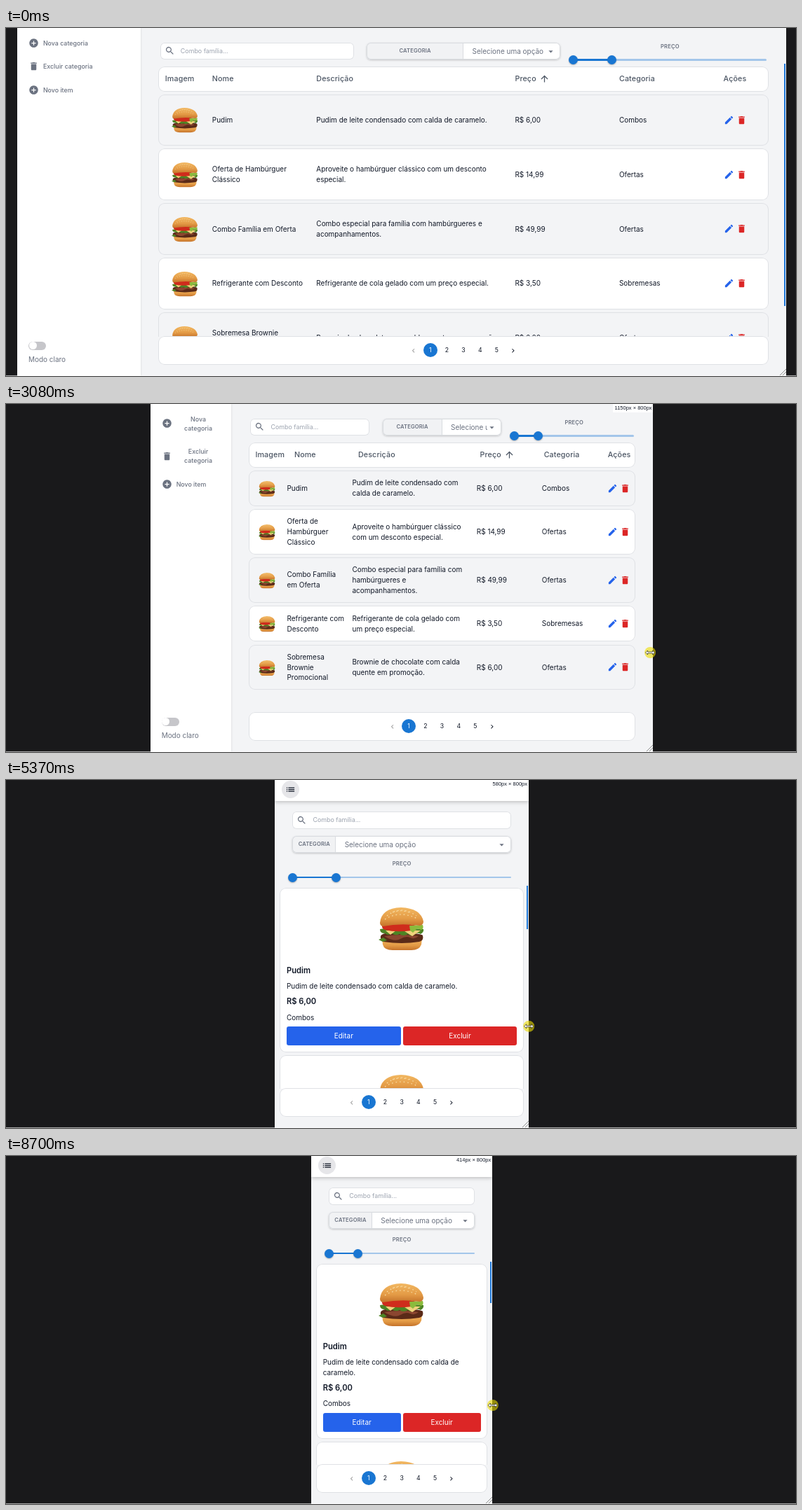
Write an HTML page that moves like this. It is 1126 px wide and 497 px high and loops after 8.96 s.

```html
<!DOCTYPE html>
<html lang="pt-BR">
<head>
<meta charset="utf-8">
<style>
  html, body { margin: 0; width: 100%; height: 100%; overflow: hidden; background: #19191b; }
  body { position: relative; font: 9.97px/1.5 Inter, sans-serif; color: #111827; }
  body::after { content: ""; position: absolute; left: 0; right: 0; top: 496px; height: 1px; background: #fff9; }
  svg { display: block; flex: none; }
  .icon { width: 15px; height: 15px; fill: currentColor; }
  #page { position: absolute; top: 0; height: 497px; overflow: hidden; background: #f3f4f6; }
  .box { background: #fff; border-radius: 9px; box-shadow: inset 0 0 0 1px #dfe1e5; }

  aside { position: absolute; left: 0; top: 0; bottom: 0; width: var(--side); background: #fff;
    box-shadow: 0 0 3px #0002; color: #6b7280; }
  .menu { position: absolute; left: 16px; right: 15.5px; top: 14.5px; font: 500 8.85px/13px Inter, sans-serif; }
  .menu div { display: flex; align-items: center; gap: 6px; margin-bottom: 20.6px; text-align: center; }
  .menu .icon { margin: -1px 0; }
  .toggle { position: absolute; left: 16px; top: 447.5px; width: 25px; height: 12.5px; border-radius: 7px; background: #c6c6ca; }
  .toggle::after { content: ""; position: absolute; left: .7px; top: .7px; width: 11px; height: 11px; border-radius: 50%; background: #fff; }
  .mode { position: absolute; left: 16px; top: 466px; }

  nav { display: none; position: absolute; left: 0; right: 0; top: 0; height: 29.5px; background: #fff; box-shadow: 0 1px 6px #0004; }
  nav span { position: absolute; left: 9.7px; top: 1.3px; width: 25px; height: 25px; border-radius: 50%; background: #e6e6e9;
    display: grid; place-items: center; }

  main { position: absolute; left: var(--left); right: var(--right); top: 0; bottom: 0; }
  .filters { position: absolute; left: var(--inset); right: var(--inset); top: 20.5px; display: grid;
    grid-template-columns: repeat(3, minmax(0, 1fr)); gap: 10px 18.6px; }
  .filters > * { height: 24.5px; position: relative; }
  .filters .box { border-radius: 6px; }
  .search { font-size: 8.9px; line-height: 24.5px; color: #9ca3af; padding-left: 29px; box-sizing: border-box; }
  .search .icon { position: absolute; left: 6px; top: 4.5px; color: #6b7280; }
  .category { display: flex; color: #6b7280; line-height: 24.5px; }
  .filters .category { box-shadow: inset 0 0 0 1px #d9dce0, 0 1px 3px #0003; }
  .caps { font-size: 7.6px; font-weight: 600; letter-spacing: .15px; text-align: center; }
  .category .caps { width: 50%; box-sizing: border-box; background: #f1f2f4; border-radius: 6px 0 0 6px;
    box-shadow: inset 0 0 0 1px #d9dce0; }
  .select { flex: 1; min-width: 0; position: relative; padding-left: 12.5px; padding-right: 20px; }
  .select span { display: block; overflow: hidden; white-space: nowrap; }
  .select .icon { position: absolute; right: 6px; top: 5px; }
  .price-filter .caps { line-height: 11px; color: #6b7280; }
  .rail, .rail i { position: absolute; left: 0; height: 2.4px; border-radius: 2px; }
  .rail { top: 23.8px; width: 100%; background: #a3c6ea; }
  .rail i { width: 20%; background: #1976d2; }
  .rail b { position: absolute; top: -5.3px; width: 13px; height: 13px; margin-left: -6.5px; border-radius: 50%;
    background: #1976d2; box-shadow: 0 1px 2px #0004; }

  .row, .head { display: grid; align-items: center;
    grid-template-columns: var(--first) minmax(0, 18.73fr) minmax(0, 35.7fr) minmax(0, 18.73fr) minmax(0, 18.73fr) minmax(0, 8.1fr); }
  .head { --first: var(--head-first); position: absolute; left: 0; right: 0; top: 55px; height: 35.5px; color: #4b5563;
    font-size: 10.7px; font-weight: 500; letter-spacing: .12px; white-space: nowrap; }
  .head > :first-child { padding-left: 9.5px; }
  .head span { display: flex; align-items: center; gap: 4.5px; }
  .list { position: absolute; left: 0; right: 0; top: 94.5px; height: 346.5px; overflow: hidden;
    display: flex; flex-direction: column; gap: 4.4px; }
  .row { flex: none; min-height: calc(var(--first) - 3px); padding: 9.75px 0; box-sizing: border-box; }
  .row:nth-child(odd) { background: #f3f4f6; }
  .row p { margin: 0; padding-right: 10px; }
  .burger { width: calc(var(--table) * .0438); margin-left: calc(6px + var(--table) * .0144); position: relative; top: 1px; }
  .actions { display: flex; gap: 3px; }
  .actions span { color: #2563eb; }
  .actions span + span { color: #dc2626; }
  .actions em { display: none; font-style: normal; }

  .pager { position: absolute; left: 0; right: 0; top: 440.3px; height: 40.3px; display: flex; justify-content: center;
    align-items: center; gap: 3.7px; font-size: 8.7px; }
  .pager span { width: 20px; height: 20px; border-radius: 50%; display: grid; place-items: center; }
  .pager .on { background: #1976d2; color: #fff; }
  .pager .icon { width: 11.5px; height: 11.5px; }
  #bar { position: absolute; right: .6px; width: 2.4px; background: #1f78d8; }
  #size { position: absolute; right: 0; top: 0; height: 12px; padding: 0 1.5px 0 3px; background: #fff;
    font: 7.5px/12px "Liberation Sans", Arial, sans-serif; white-space: nowrap; }
  .grip { position: absolute; right: 0; bottom: 1px; width: 9px; height: 9px; stroke: #777; stroke-width: .8; }
  #cursor { position: absolute; left: -9px; top: -9px; width: 18px; height: 18px; }

  .mobile nav { display: block; }
  .mobile aside, .mobile .head { display: none; }
  .mobile .filters { top: 45px; grid-template-columns: minmax(0, 1fr); }
  .mobile .list { top: 154.3px; height: 286.7px; }
  .mobile .row { display: block; padding: 9.5px; background: #fff; }
  .mobile .row p { margin-bottom: 6.4px; padding: 0; }
  .mobile .burger { width: 66px; margin: 18px auto 20px; top: 0; }
  .mobile .row .name, .mobile .row .price { font-size: 11.2px; font-weight: 600; }
  .mobile .row .category-name { margin-bottom: 5.3px; }
  .mobile .actions svg { display: none; }
  .mobile .actions em { display: block; }
  .mobile .actions span { flex: 1; line-height: 27.4px; border-radius: 3px; text-align: center; color: #fff; background: #2563eb; }
  .mobile .actions span + span { background: #dc2626; }
  .small .category .caps { width: 61.7px; }
</style>
</head>
<body>
<svg width="0" height="0" style="position:absolute">
  <defs>
    <linearGradient id="bun" x2="0" y2="1"><stop stop-color="#f2b862"/><stop offset=".6" stop-color="#e39a45"/><stop offset="1" stop-color="#c4722a"/></linearGradient>
    <symbol id="burger" viewBox="0 0 66 62">
      <path fill="url(#bun)" d="M5 45q28 6 57-1l-1 9q-3 8-14 8H20Q8 61 6 53z"/>
      <path fill="#5a2a18" d="M3 41q2-6 30-5t30 4q2 7-5 9-25 4-51 0-5-3-4-8z"/>
      <path fill="#8b4630" d="M8 41q24-4 49 0-6 5-12 2t-14 2-23-4z"/>
      <path fill="#4d8424" d="M2 31q20-4 62 0 1 4-4 7-5-3-10 1-4 3-8-1-7 4-12 0-6 3-11-1-5 4-10 0-7 0-7-6zM0 46l7-3 5 4-6 2z"/>
      <path fill="#efd27c" d="M34 32l26 1-12 8zM10 33l15 0-8 6z"/>
      <path fill="#cf2c1c" d="M5 25q28-5 49 1-1 6-7 7-22 3-38-1-5-2-4-7z"/>
      <path fill="#8bbb3c" d="M44 26l19-1q2 5-2 7l-6-2-6 6-4-3z"/>
      <path fill="url(#bun)" d="M2 22Q4 1 32 0q28 1 32 20 0 5-5 6-27-4-53 1-4-1-4-5z"/>
      <path fill="none" stroke="#f8dda5" stroke-width="1.2" stroke-dasharray="1.6 4" d="M12 12Q32-4 54 12M9 17q22-14 48 0M20 7q12-5 26 1"/>
    </symbol>
  </defs>
</svg>
<div id="page">
  <aside><div class="menu"></div><div class="toggle"></div><div class="mode">Modo claro</div></aside>
  <nav><span></span></nav>
  <main>
    <div class="filters">
      <div class="box search">Combo família...</div>
      <div class="box category"><div class="caps">CATEGORIA</div><div class="select"><span>Selecione uma opção</span></div></div>
      <div class="price-filter"><div class="caps">PREÇO</div><div class="rail"><i></i><b style="left:0"></b><b style="left:20%"></b></div></div>
    </div>
    <div class="head box"></div>
    <div class="list"></div>
    <div class="pager box"></div>
  </main>
  <div id="bar"></div>
  <div id="size"></div>
  <svg class="grip" viewBox="0 0 9 9"><path d="M0 9L9 0M4 9L9 4"/></svg>
</div>
<svg id="cursor" viewBox="-9 -9 18 18">
  <circle id="halo" r="8" fill="#ecdc00" fill-opacity=".6"/>
  <path d="M-6.5 0l3-3v2h7v-2l3 3-3 3v-2h-7v2z" fill="#fff" stroke="#222" stroke-width=".7"/>
</svg>
<script>
const paths = {
  add: 'M12 2a10 10 0 1 0 .01 0zM17 13h-4v4h-2v-4H7v-2h4V7h2v4h4z',
  trash: 'M6 19c0 1.1.9 2 2 2h8c1.1 0 2-.9 2-2V7H6zM19 4h-3.5l-1-1h-5l-1 1H5v2h14z',
  pencil: 'M3 17.25V21h3.75L17.81 9.94l-3.75-3.75zM20.71 7.04q.7-.7 0-1.41l-2.34-2.34q-.7-.7-1.41 0l-1.83 1.83 3.75 3.75z',
  search: 'M15.5 14h-.8l-.3-.3a6.5 6.5 0 1 0-.7.7l.3.3v.8l5 5 1.5-1.5zM9.5 14a4.5 4.5 0 1 1 .01 0z',
  up: 'M4 12l1.4 1.4L11 7.8V20h2V7.8l5.6 5.6L20 12l-8-8z',
  list: 'M3 7h2v2H3zM3 11h2v2H3zM3 15h2v2H3zM7 7h14v2H7zM7 11h14v2H7zM7 15h14v2H7z',
  drop: 'M7 10l5 5 5-5z',
  prev: 'M15.4 7.4L14 6l-6 6 6 6 1.4-1.4-4.6-4.6z',
  next: 'M10 6L8.6 7.4l4.6 4.6-4.6 4.6L10 18l6-6z'
};
const $ = selector => document.querySelector(selector);
const icon = name => `<svg class="icon" viewBox="0 0 24 24"><path fill-rule="evenodd" d="${paths[name]}"/></svg>`;

const products = [
  ['Pudim', 'Pudim de leite condensado com calda de caramelo.', '6,00', 'Combos'],
  ['Oferta de Hambúrguer Clássico', 'Aproveite o hambúrguer clássico com um desconto especial.', '14,99', 'Ofertas'],
  ['Combo Família em Oferta', 'Combo especial para família com hambúrgueres e acompanhamentos.', '49,99', 'Ofertas'],
  ['Refrigerante com Desconto', 'Refrigerante de cola gelado com um preço especial.', '3,50', 'Sobremesas'],
  ['Sobremesa Brownie Promocional', 'Brownie de chocolate com calda quente em promoção.', '6,00', 'Ofertas']
];
$('.menu').innerHTML = [['add', 'Nova categoria'], ['trash', 'Excluir categoria'], ['add', 'Novo item']]
  .map(([name, text]) => `<div>${icon(name)}<span>${text}</span></div>`).join('');
$('nav span').innerHTML = icon('list');
$('.search').insertAdjacentHTML('beforeend', icon('search'));
$('.select').insertAdjacentHTML('beforeend', icon('drop'));
$('.head').innerHTML = ['Imagem', 'Nome', 'Descrição', 'Preço' + icon('up'), 'Categoria', 'Ações']
  .map(text => `<span>${text}</span>`).join('');
$('.list').innerHTML = products.map(([name, text, price, category]) => `<div class="row box">
  <svg class="burger" viewBox="0 0 66 62"><use href="#burger"/></svg>
  <p class="name">${name}</p><p>${text}</p><p class="price">R$ ${price}</p><p class="category-name">${category}</p>
  <div class="actions"><span>${icon('pencil')}<em>Editar</em></span><span>${icon('trash')}<em>Excluir</em></span></div></div>`).join('');
$('.pager').innerHTML = `<span style="color:#999">${icon('prev')}</span><span class="on">1</span>` +
  [2, 3, 4, 5].map(n => `<span>${n}</span>`).join('') + `<span>${icon('next')}</span>`;

const LOOP = 8960, SCALE = .623;
const CURSOR_IN = 65, PRESS = 1210, DRAG_START = 1350;
// [ms, viewport width in CSS px]
const widthKeys = [[0, 1759], [1290, 1759], [1760, 1704], [2240, 1553], [2380, 1520], [3080, 1150], [3150, 1133],
  [3960, 860], [4100, 860], [4570, 772], [5040, 677], [5370, 580], [5500, 580], [6390, 484], [6460, 481], [6530, 481],
  [7230, 442], [7700, 442], [8040, 426], [8430, 426], [8700, 414]];
// [ms, offset from the right edge] and [ms, y]
const cursorX = [[0, -2], [410, -2], [1220, 2], [1760, -3], [3080, -4], [4570, 0], [6390, 1.5], [8700, 1]];
const cursorY = [[0, 490], [270, 375], [1220, 369], [1760, 367], [2380, 361], [3080, 355], [4570, 351.5], [6390, 352], [8700, 356]];

function at(keys, t) {
  const i = keys.findIndex(key => key[0] > t);
  if (i < 0) return keys[keys.length - 1][1];
  const [t0, a] = keys[i - 1], [t1, b] = keys[i];
  return a + (b - a) * (t - t0) / (t1 - t0);
}

const page = $('#page'), list = $('.list'), bar = $('#bar');
const show = (element, visible) => element.style.display = visible ? '' : 'none';

function draw(t) {
  const cssWidth = Math.round(at(widthKeys, t)), width = cssWidth * SCALE;
  const left = (1127.7 - width) / 2, right = left + width;
  const mobile = cssWidth < 1024, small = cssWidth < 640;
  const side = width * .161, table = width - side - 50, first = 16.5 + table * .069;
  page.className = (mobile ? 'mobile' : '') + (small ? ' small' : '');
  page.style.left = left + 'px';
  page.style.width = width + 'px';
  const vars = {
    side, table, first, 'head-first': Math.max(first, 65),
    left: mobile ? 7.3 : side + 25, right: mobile ? 6.7 : 25,
    inset: mobile ? (small ? 18 : 40) : 2.5
  };
  for (const name in vars) page.style.setProperty('--' + name, vars[name] + 'px');

  const view = mobile ? 289 : 387, content = list.scrollHeight + (mobile ? 149 : 48);
  show(bar, list.scrollHeight > list.clientHeight + 1);
  bar.style.top = (mobile ? 151 : 51) + 'px';
  bar.style.height = view * view / content + 'px';

  show($('#size'), t >= DRAG_START);
  $('#size').textContent = `${cssWidth}px × 800px`;
  show($('#cursor'), t >= CURSOR_IN);
  $('#cursor').style.transform = `translate(${right + at(cursorX, t)}px, ${at(cursorY, t)}px)`;
  show($('#halo'), t >= PRESS);
}

function tick() {
  draw(performance.now() % LOOP);
  requestAnimationFrame(tick);
}
tick();
</script>
</body>
</html>
```
